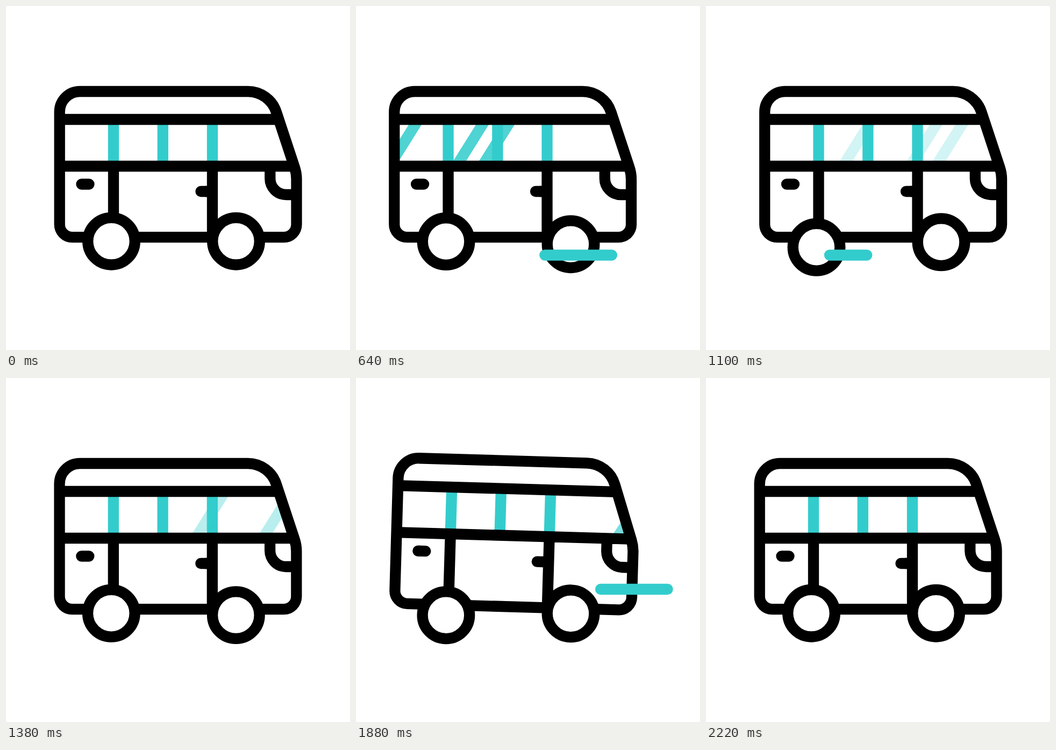
These frames come from a looping animation (640 by 640 pixels, 2400 ms). An HTML page:

```html
<!DOCTYPE html>
<html lang="en">
<head>
<meta charset="utf-8">
<title>Van</title>
<style>
  html, body { margin: 0; width: 100%; height: 100%; overflow: hidden; background: #fff; }
  svg { display: block; width: 100%; height: 100%; }
  .ink { fill: none; stroke: #000; stroke-width: 20.3; }
  .teal { fill: none; stroke: #3cc; stroke-width: 20.3; }
  .round { stroke-linecap: round; }
  .wheel { fill: #fff; }
</style>
</head>
<body>
<svg viewBox="0 0 640 640">
  <clipPath id="glass"><path d="M100 211H507L536 298H100z"/></clipPath>
  <g id="van">
    <path class="teal" d="M200 211V298M291.8 211V298M384 211V298"/>
    <g clip-path="url(#glass)">
      <path id="shine" class="teal" d="M-6.8 317.5L73 190M118.2 317.5L198 190M166.2 317.5L246 190"/>
    </g>
    <path class="ink" d="M137.5 159H450A55.7 55.7 0 0 1 502.9 197.3L536.8 300Q540.5 311 540.5 322V406.5A23.7 23.7 0 0 1 516.8 430.2H123.4A23.7 23.7 0 0 1 99.7 406.5V197A38 38 0 0 1 137.5 159z"/>
    <path class="ink" d="M99.7 211H506M99.7 298H536M200 298V410M384 298V430M384 345H370M491.3 298V321A30 30 0 0 0 521.3 351H540.5"/>
    <path class="ink round" d="M140.5 331.5H154.5M362.5 345H375"/>
    <circle id="rear" class="ink wheel" cx="196" cy="437.7" r="43.8"/>
    <circle id="front" class="ink wheel" cx="428" cy="437.7" r="43.8"/>
  </g>
  <path id="low" class="teal round"/>
  <path id="high" class="teal round"/>
</svg>
<script>
const LOOP = 2400;
const el = id => document.getElementById(id);
const ease = (t, from, to) => {
  const p = Math.min(1, Math.max(0, (t - from) / (to - from)));
  return p * p * (3 - 2 * p);
};

// Two 800 ms dips of a wheel
const dip = (t, start, depth) =>
  t < start || t > start + 1600 ? 0 : depth * Math.sin(Math.PI * (t - start) / 800) ** 2;

// A road streak grows leftwards, slides left, then shrinks away
function streak(id, t, x, y, grow, move, shrink) {
  const length = 124.5;
  const head = ease(t, ...grow), tail = ease(t, ...shrink);
  const right = x - 178.5 * ease(t, ...move);
  const visible = head > 0 && tail < 1;
  el(id).setAttribute('d', visible ? `M${right - length * tail} ${y}H${right - length * head - 0.01}` : '');
}

function draw(t) {
  const x = -30 * ease(t, 210, 710) + 45 * ease(t, 710, 1210)
          - 56 * ease(t, 1210, 1710) + 41 * ease(t, 1710, 2210);
  const tilt = 2.17 * (ease(t, 1710, 1960) - ease(t, 1960, 2210));
  el('van').setAttribute('transform', `translate(${x}) rotate(${tilt} 480 490)`);
  el('rear').setAttribute('cy', 437.7 + dip(t, 600, 13));
  el('front').setAttribute('cy', 437.7 + dip(t, 410, 8.9));

  const fade = t < 210 || t > 2210 ? 0 : 1 - Math.abs((t - 210) % 1000 / 500 - 1);
  el('shine').setAttribute('transform', `translate(${23 + 518 * ease(t, 210, 2210)})`);
  el('shine').setAttribute('opacity', fade);

  streak('low', t, 533, 463.5, [140, 530], [490, 890], [916, 1316]);
  streak('high', t, 594.5, 393, [1388, 1778], [1810, 2210], [2010, 2210]);
}

const begin = performance.now();
function tick() {
  draw((performance.now() - begin) % LOOP);
  requestAnimationFrame(tick);
}
tick();
</script>
</body>
</html>
```
